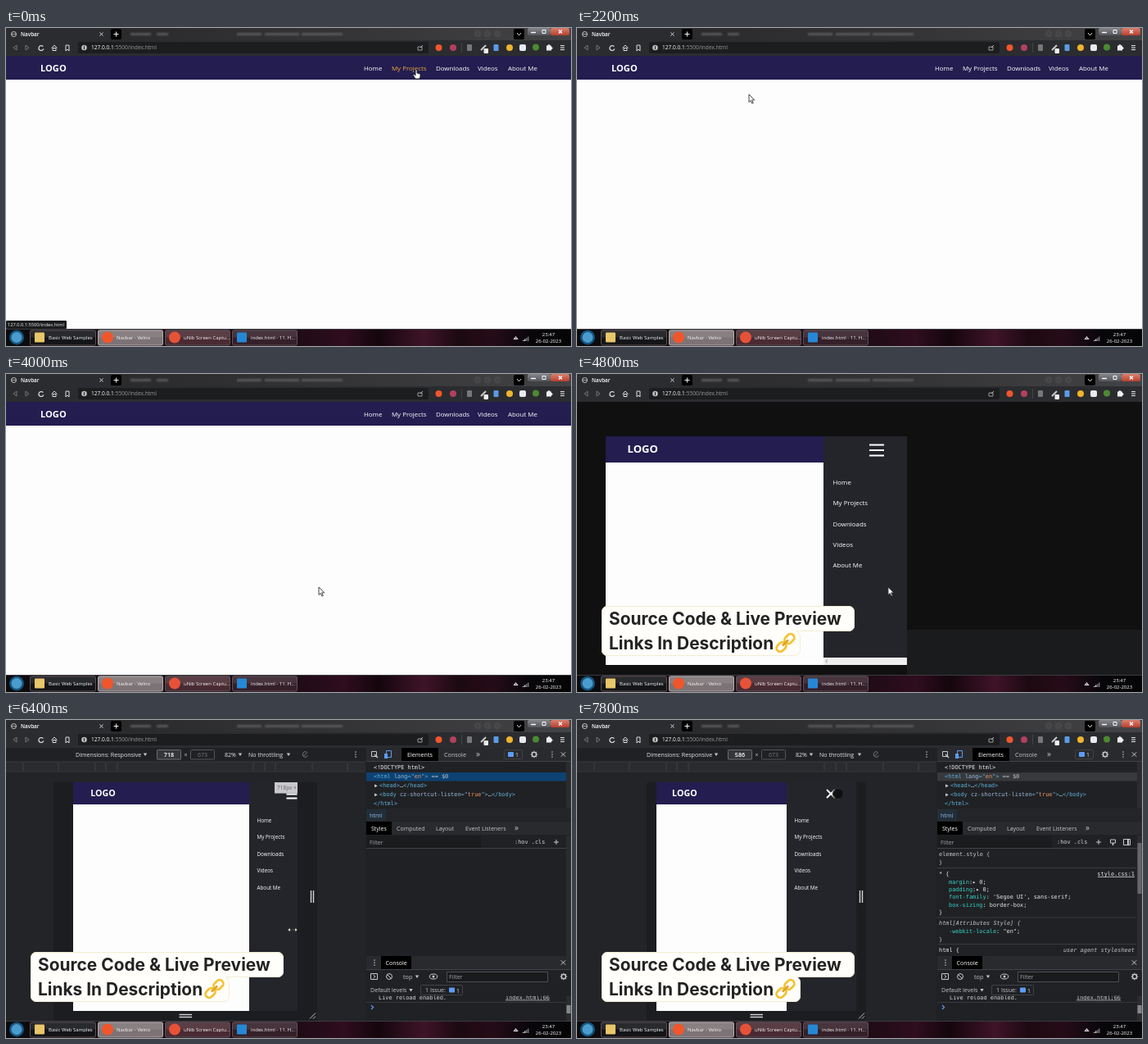
Recreate the animation shown at these times as an HTML page with a canvas. Size 690x388 px, loop 8000 ms.

```html
<!DOCTYPE html>
<html lang="en">
<head>
<meta charset="utf-8">
<title>Responsive navbar</title>
<style>
html, body { margin: 0; width: 690px; height: 388px; overflow: hidden; background: #111; }
canvas { display: block; }
</style>
</head>
<body>
<canvas id="stage" width="690" height="388"></canvas>
<script>
const ctx = document.getElementById('stage').getContext('2d');
const UI = '"Open Sans", sans-serif', MONO = '"DejaVu Sans Mono", monospace', HEAD = 'Inter, sans-serif';
const NAVY = '#231d50', GREY = '#c4c8cc', LINE = '#3f4246', BLUE = '#5d9cf5';
const LINKS = [['Home', 437, 459], ['My Projects', 471, 513], ['Downloads', 525, 565], ['Videos', 576, 601], ['About Me', 613, 649]];
const CURSOR = [
  [0, 501, 51], [300, 540, 50], [600, 588, 49], [900, 632, 50], [1100, 632, 50], [1500, 490, 50],
  [1800, 310, 60], [2200, 210, 81], [2300, 210, 81], [2800, 500, 50], [2900, 500, 50], [3200, 612, 50],
  [3300, 612, 50], [3500, 382, 260], [4300, 382, 260], [4800, 380, 260], [5000, 380, 260], [5400, 407, 247],
  [5800, 407, 250], [6400, 350, 256], [6600, 335, 257], [6800, 335, 257], [7000, 319, 90], [8000, 319, 90]
];

const ramp = (t, a, b) => Math.min(1, Math.max(0, (t - a) / (b - a)));

function rect(x, y, w, h, color, r = 0) {
  ctx.fillStyle = color;
  ctx.beginPath();
  ctx.roundRect(x, y, w, h, r);
  ctx.fill();
}
function disc(x, y, r, color) { rect(x - r, y - r, 2 * r, 2 * r, color, r); }
function path(points, color, width = 1, close = false) {
  ctx.strokeStyle = color;
  ctx.lineWidth = width;
  ctx.beginPath();
  for (let i = 0; i < points.length; i += 2) ctx.lineTo(points[i], points[i + 1]);
  if (close) ctx.closePath();
  ctx.stroke();
}
function ring(x, y, r, color, width = 1, from = 0, to = 7) {
  ctx.strokeStyle = color;
  ctx.lineWidth = width;
  ctx.beginPath();
  ctx.arc(x, y, r, from, Math.min(to, from + 2 * Math.PI));
  ctx.stroke();
}
function frame(x, y, w, h, color, r = 0) {
  ctx.strokeStyle = color;
  ctx.lineWidth = 1;
  ctx.beginPath();
  ctx.roundRect(x, y, w, h, r);
  ctx.stroke();
}
function gradient(x, y, stops) {
  const g = ctx.createLinearGradient(0, 0, x, y);
  stops.forEach(s => g.addColorStop(...s));
  return g;
}
function text(s, x, y, size = 7, color = GREY, family = UI, style = '500', align = 'left') {
  ctx.font = `${style} ${size}px ${family}`;
  ctx.fillStyle = color;
  ctx.textAlign = align;
  ctx.textBaseline = 'alphabetic';
  ctx.fillText(s, x, y + size * 0.36);
  return ctx.measureText(s).width;
}
function code(x, y, ...runs) {
  for (let i = 0; i < runs.length; i += 2) x += text(runs[i], x, y, 6.9, runs[i + 1], MONO, '');
}
function cross(x, y, r, color, width = 1) {
  path([x - r, y - r, x + r, y + r], color, width);
  path([x - r, y + r, x + r, y - r], color, width);
}
function plus(x, y, r, color) {
  path([x - r, y, x + r, y], color);
  path([x, y - r, x, y + r], color);
}
function dots(x, y, color = GREY) { for (let k = -1; k < 2; k++) disc(x, y + 3 * k, 0.8, color); }
function down(x, y, color = GREY) {
  ctx.fillStyle = color;
  ctx.beginPath();
  ctx.moveTo(x - 2.2, y - 1.5); ctx.lineTo(x + 2.2, y - 1.5); ctx.lineTo(x, y + 2);
  ctx.fill();
}
function gear(x, y) {
  ring(x, y, 2.6, GREY, 1.4);
  for (let a = 0; a < 6.2; a += Math.PI / 4)
    path([x + 3 * Math.cos(a), y + 3 * Math.sin(a), x + 4.3 * Math.cos(a), y + 4.3 * Math.sin(a)], GREY, 1.2);
}

function browser() {
  rect(0, 0, 690, 16, gradient(690, 0, [[0.18, '#2a2a2c'], [0.6, '#343436'], [1, '#434346']]));
  rect(0, 0, 126, 16, '#2b2c2f', 2);
  rect(0, 15, 690, 19, '#2b2c2f');
  ring(9.5, 7.5, 3, '#ccc');
  path([6.5, 7.5, 12.5, 7.5], '#ccc', 0.7);
  text('Navbar', 18, 7.5, 6.4, '#fff', UI, '600');
  cross(116.5, 7.5, 2, '#ddd');
  rect(128, 1, 13, 13, '#000', 2);
  plus(134.5, 7.5, 3, '#eee');
  ctx.filter = 'blur(1.2px)';
  for (const [x, w] of [[152, 25], [184, 14], [282, 30], [316, 42], [361, 50]]) rect(x, 6, w, 3, '#58585b');
  for (let x = 576; x < 610; x += 12) ring(x, 7, 3, '#626264');
  ctx.filter = 'none';
  rect(620, 1, 13, 13, '#000', 2);
  path([624, 6, 626.5, 9, 629, 6], '#ddd');
  rect(637, 0, 28, 9, gradient(0, 9, [[0, '#85868b'], [1, '#54565c']]), 2);
  rect(665, 0, 23, 9, gradient(0, 9, [[0, '#d9806f'], [1, '#b93f2f']]), 2);
  path([641, 5.5, 647, 5.5], '#fff', 1.4);
  frame(655, 2.5, 4, 4, '#fff');
  cross(677, 4.5, 2, '#fff', 1.3);

  path([13, 21, 9, 24, 13, 27], '#777', 1, true);
  path([24, 21, 28, 24, 24, 27], '#777', 1, true);
  ring(43, 24.5, 3, '#ddd', 1.2, 0.3, 5.6);
  path([55.5, 24.5, 59, 21, 62.5, 24.5], '#ddd');
  frame(57, 24.5, 4, 3, '#ddd');
  path([73, 21, 77, 21, 77, 28, 75, 26, 73, 28], '#ddd', 1, true);
  rect(88, 17, 428, 14, '#1c1d1f', 2);
  disc(95.5, 24, 3.3, '#bbb');
  path([95.5, 22, 95.5, 26], '#222');
  const host = text('127.0.0.1', 104, 24, 6.6, '#fff');
  text(':5500/index.html', 104 + host, 24, 6.6, '#999');
  frame(503, 23, 5, 4, '#999');
  path([506, 24, 509, 21], '#bbb');
  disc(528.5, 24, 4, '#f0562b');
  disc(546, 24, 4, '#b2405f');
  path([556.5, 18, 556.5, 30], '#444');
  rect(563, 20, 6, 8, '#777', 1);
  path([580, 27, 586, 21], '#ccc', 2);
  rect(583.5, 25, 5.5, 6, '#eee', 1);
  rect(595.5, 20, 6, 8, '#5a9be6', 1);
  disc(615, 24, 4, '#eeb42e');
  rect(627, 20, 8, 8, '#e8eaf0', 2);
  disc(647, 23.5, 4, '#4b8a32');
  rect(660, 21.5, 6, 6, '#eee');
  disc(663, 21.5, 1.5, '#eee');
  disc(666, 24.5, 1.5, '#eee');
  for (let y = 21.5; y < 28; y += 2.5) path([677, y, 682, y], '#ddd', 1.1);
}

function taskbar() {
  rect(0, 367, 690, 21, gradient(690, 0, [[0, '#0b0b0d'], [0.5, '#1c0b14'], [0.6, '#2f0d1e'], [0.66, '#14060d'],
    [0.74, '#3f1428'], [0.8, '#1c0911'], [0.86, '#260c18'], [0.93, '#08060a'], [1, '#050506']]));
  rect(0, 367, 690, 1, '#3b3b3f');
  disc(13, 377.5, 9, '#16547f');
  disc(13, 377.5, 6.5, '#4a9ccc');
  [['Basic Web Samples', 29, 81, '#141518', '#e8c66a'], ['Navbar - Velno', 112, 80, '#7d7376', '#f0562b'],
   ['uNib Screen Captu...', 194, 80, '#4a2b33', '#e65238'], ['index.html - 11. H...', 276, 80, '#35202a', '#2688d4']]
    .forEach(([label, x, w, color, icon], i) => {
      rect(x, 368.5, w, 18.5, color, 2);
      rect(x, 368.5, w, 9, 'rgba(255,255,255,.09)', 2);
      frame(x + 0.5, 369, w - 1, 18, i == 1 ? '#b3aaad' : '#5f5157', 2);
      if (i == 1 || i == 2) disc(x + 12, 377.5, 7, icon);
      else rect(x + 6, 371.5, 12, 12, icon, 1);
      text(label, x + 23, 377.5, 6, '#fff');
    });
  path([620.5, 379.5, 622.5, 377, 624.5, 379.5], '#ddd', 1.2, true);
  for (let i = 0; i < 4; i++) rect(631 + i * 2, 381 - i * 1.5, 1.4, 1 + i * 1.5, i < 2 ? '#ddd' : '#777');
  text('23:47', 662.5, 373.5, 6, '#fff', UI, '500', 'center');
  text('26-02-2023', 662.5, 382, 6, '#fff', UI, '500', 'center');
}

function wideSite(hovered) {
  rect(0, 34, 690, 333, '#fdfdfd');
  rect(0, 34, 690, 29, NAVY);
  text('LOGO', 42, 49, 11.1, '#fff', UI, 'bold');
  for (const link of LINKS) text(link[0], link[1], 49, 7.9, link === hovered ? '#eda63c' : '#fff');
}

const liveWidth = t => 886 - 300 * ramp(t, 5800, 6590);
function sidebarShut(t) {
  if (t < 6285) return ramp(t, 4800, 5100);
  return t < 7000 ? ramp(t, 6285, 6580) : 1 - ramp(t, 7000, 7300);
}

function narrowSite(t) {
  const half = Math.round(liveWidth(t) * 0.4155 / 2), width = 2 * half, left = 219 - half, right = 219 + half;
  const small = t >= 6285, dragging = t > 5800 && t < 6700;
  const barHeight = small ? 27 : 32, midBar = small ? 90 : 92.5;
  ctx.save();
  ctx.beginPath();
  ctx.rect(left, 76, width, 279);
  ctx.clip();
  rect(left, 76, width, 279, '#fdfdfd');
  rect(left, 76, width, barHeight, NAVY);
  text('LOGO', left + width * 0.072 + (small ? 1.5 : 0), midBar - (small ? 0.5 : 1), small ? 10.7 : 13.1, '#fff', UI, 'bold');

  const sideWidth = width * (small ? 0.35 : 0.277), side = Math.round(right - sideWidth * (1 - sidebarShut(t)));
  rect(side, 76, sideWidth + 1, 279, '#24252b');
  LINKS.forEach(([label], i) =>
    text(label, side + (small ? 9.5 : 11.5), small ? 122.5 + i * 20.5 : 132.5 + i * 25.1, small ? 6.3 : 7.9, '#fff'));
  if (t < 5000) {
    rect(side, 346, sideWidth, 9, '#eeeeef');
    path([305.5, 348.5, 304, 350.5, 305.5, 352.5], '#888');
  }
  const menuX = right - (small ? (dragging ? 7 : 31) : 37);
  if (t >= 7000) cross(menuX, midBar, 5, '#fff', 1.8);
  else for (let k = -1; k < 2; k++) {
    const reach = small ? 6.5 : 9, gap = small ? 5 : 6.5;
    path([menuX - reach, midBar + 0.5 + k * gap, menuX + reach, midBar + 0.5 + k * gap], '#fff', 2);
  }
  if (dragging) {
    rect(right - 28, 76, 28, 13.5, '#c9c9cd');
    text(Math.floor(liveWidth(t - 160)) + 'px ×', right - 25, 83, 6.5, '#666');
  }
  ctx.restore();
}

function deviceBar(t) {
  const w = Math.floor(liveWidth(t - 160)), half = Math.round(w * 0.4155 / 2), edge = 219 + half;
  rect(0, 34, 439, 333, '#232428');
  rect(0, 34, 439, 17, '#202124');
  rect(0, 51, 439, 12, '#2a2b2f');
  path([0, 51, 439, 51], LINE, 0.7);
  path([0, 63, 439, 63], '#3a3b3f', 0.7);
  for (const d of [83, 97, 110, 155, 198]) {
    path([219 - d, 52, 219 - d, 62], '#404146');
    path([219 + d, 52, 219 + d, 62], '#404146');
  }
  text('Dimensions: Responsive', 85, 42, 7.1, '#e4e6e8');
  down(170, 42);
  rect(184, 36, 30, 12.5, '#35363a', 1);
  frame(184.5, 36.5, 29, 11.5, '#6a6c70', 1);
  text(w, 199, 42, 7.2, '#fff', UI, '600', 'center');
  text('×', 219.5, 42, 7, GREY, UI, '', 'center');
  frame(225.5, 36.5, 29, 11.5, '#55575b', 1);
  text('673', 240, 42, 7, '#74777b', UI, '', 'center');
  text('82%', 267, 42, 7.1, '#e4e6e8');
  down(286, 42);
  text('No throttling', 296, 42, 7.1, '#e4e6e8');
  down(345, 42);
  ring(365.5, 42, 3.3, '#74777b', 1, 0.4, 5.4);
  path([363.5, 44, 367.5, 40], '#74777b', 1);
  dots(427, 42);

  rect(219 - half - 12, 76, 2 * half + 24, 291, '#1c1d20', 3);
  for (const d of [-1.5, 1.5]) {
    path([edge + 6 + d, 208, edge + 6 + d, 223], '#d4d5d8', 1.4);
    path([211.5, 361 + d, 227, 361 + d], '#d4d5d8', 1.4);
  }
  path([edge + 3, 364.5, edge + 10, 357.5], '#c4c5c8');
  path([edge + 7, 364.5, edge + 10, 361.5], '#c4c5c8');
}

function elements(styled) {
  const tag = '#5db0d7', attr = '#9bbbdc', val = '#f29766', prop = '#35d4c7', white = '#e8eaed';
  rect(440, 64, 250, 10.5, styled ? '#37393d' : '#0d4272');
  code(449, 58, '<!DOCTYPE html>', white);
  code(449, 69, '<html ', tag, 'lang', attr, '="', tag, 'en', val, '">', tag, ' == $0', GREY);
  text('▶', 450, 79.5, 6.5, GREY, MONO, '');
  code(456, 80, '<head>', tag, '…', GREY, '</head>', tag);
  text('▶', 450, 90.5, 6.5, GREY, MONO, '');
  code(456, 91, '<body ', tag, 'cz-shortcut-listen', attr, '="', tag, 'true', val, '">', tag, '…', GREY, '</body>', tag);
  code(449, 101.5, '</html>', tag);
  rect(684, 51, 6, 57, '#2b2c2f');
  rect(440, 108, 250, 15.5, '#242528');
  rect(440, 109, 24, 14, '#232e38');
  text('html', 444, 116, 7.2, '#8ab9ee');
  rect(440, 124, 250, 16, '#292a2d');
  rect(440, 124, 31, 16, '#000');
  text('Styles', 446, 132, 7, '#fff');
  text('Computed', 477, 132, 7);
  text('Layout', 525, 132, 7);
  text('Event Listeners', 561, 132, 7);
  text('»', 621, 131.5, 10);
  rect(440, 141, 140, 15, '#1b1c1e');
  path([440, 156.5, 690, 156.5], LINE);
  text('Filter', 444, 149, 7, '#a0a3a8');
  const shift = styled ? 586 : 621;
  code(shift, 149, ':hov .cls', '#d5d7da');
  plus(shift + 51, 149, 3, GREY);
  if (styled) {
    frame(651.5, 146, 6, 4, GREY);
    path([654.5, 150, 654.5, 153], GREY, 1.5);
    frame(667.5, 145.5, 8, 7, GREY);
    path([673, 145, 673, 153], GREY, 2);
  }
  if (!styled) { rect(684, 141, 6, 147, '#2b2c2f'); return; }
  code(442, 163.5, 'element.style {', GREY);
  code(442, 173.5, '}', GREY);
  code(442, 187.5, '* {', white);
  code(454, 198, 'margin', prop, ':▸ 0;', white);
  code(454, 207, 'padding', prop, ':▸ 0;', white);
  code(454, 216, 'font-family', prop, ": 'Segoe UI', sans-serif;", white);
  code(454, 225.5, 'box-sizing', prop, ': border-box;', white);
  code(442, 235, '}', white);
  text('html[Attributes Style] {', 442, 247.5, 6.9, GREY, MONO, 'italic');
  code(454, 258, '-webkit-locale', prop, ': "en";', white);
  code(442, 267.5, '}', GREY);
  code(442, 280.5, 'html {', white);
  text('style.css:1', 681, 187.5, 6.9, white, MONO, '', 'right');
  path([636, 191.5, 681, 191.5], white, 0.7);
  text('user agent stylesheet', 681, 280.5, 6.9, GREY, MONO, 'italic', 'right');
  for (const y of [180.5, 241, 273.5]) path([440, y, 683, y], LINE, 0.8);
  rect(684, 141, 6, 147, '#2b2c2f');
  rect(684.5, 150, 5, 62, '#65676b');
}

function badge(x, y) {
  rect(x, y - 3.5, 7, 6, BLUE, 1);
  text('1', x + 9, y, 7, '#d5d7da');
}

function devtools(t) {
  const loaded = t >= 5600;
  rect(439, 34, 251, 333, '#202124');
  rect(440, 34, 250, 16.5, '#292a2d');
  frame(446.5, 38.5, 6, 6, GREY);
  path([450, 42, 454, 46], GREY, 1.5);
  frame(464.5, 37.5, 6, 8, BLUE);
  rect(462, 41, 4, 6, BLUE);
  rect(483, 34, 45, 16.5, '#000');
  text('Elements', 490, 42, 7.2, '#fff');
  text('Console', 535, 42, 7.2);
  if (loaded) {
    text('»', 574, 41.5, 10);
    frame(608.5, 36.5, 22, 11, LINE, 1);
    badge(613, 42.5);
    gear(645, 42);
    dots(667, 42);
  } else {
    text('Sources', 576, 42, 7.2);
    text('Network', 617, 42, 7.2);
    text('»', 658, 41.5, 10);
  }
  cross(680.5, 42, 2.7, GREY);
  path([440, 50.5, 690, 50.5], LINE);
  if (loaded) elements(t >= 6900);

  rect(440, 288, 250, 16.5, '#292a2d');
  dots(450, 296);
  rect(458, 288, 37, 16.5, '#000');
  text('Console', 463.5, 296, 7, '#fff');
  cross(680.5, 296, 2.7, GREY);
  path([440, 304.5, 690, 304.5], LINE);
  frame(445.5, 309.5, 8, 7, GREY);
  path([448.5, 311, 451, 313, 448.5, 315], GREY);
  ring(468, 313, 3.5, GREY);
  path([465.5, 310.5, 470.5, 315.5], GREY);
  const eye = loaded ? 522 : 511;
  if (loaded) text('top', 485, 313, 7.2);
  down(loaded ? 502 : 491, 313, loaded ? GREY : '#666');
  ctx.strokeStyle = GREY;
  ctx.beginPath();
  ctx.ellipse(eye, 313, 4.7, 3, 0, 0, 7);
  ctx.stroke();
  disc(eye, 313, 1.5, GREY);
  rect(eye + 16, 307, 646 - eye, 13, '#191a1c');
  frame(eye + 16.5, 307.5, 645 - eye, 12, '#4c4f53');
  text('Filter', eye + 19, 313.5, 7, '#a0a3a8');
  gear(681, 313);
  text('Default levels', 445, 329.5, 7.1);
  down(494.5, 329.5);
  frame(506.5, 323.5, loaded ? 51 : 42, 12, LINE, 1);
  text(loaded ? '1 Issue:' : 'No Issues', 512, 329.5, 7.1);
  if (loaded) {
    badge(541, 330);
    ctx.save();
    ctx.beginPath();
    ctx.rect(440, 336.5, 250, 10);
    ctx.clip();
    code(455, 338.5, 'Live reload enabled.', '#d5d7da');
    text('index.html:66', 664, 338.5, 6.9, GREY, MONO, '', 'right');
    path([610, 342, 664, 342], GREY, 0.7);
    ctx.restore();
    path([440, 344.5, 684, 344.5], LINE, 0.7);
    rect(684, 337, 6, 30, '#2b2c2f');
    rect(684.5, 348, 5, 10, '#85878b');
  } else path([440, 336.5, 690, 336.5], LINE, 0.7);
  const y = loaded ? 350.5 : 345;
  path([446, y - 2.5, 448.5, y, 446, y + 2.5], BLUE, 1.2);
  if (!loaded) path([454.5, y - 4, 454.5, y + 4], '#ddd');
}

function banner(alpha) {
  ctx.globalAlpha = alpha;
  for (const [y, w] of [[283, 309], [313, 243]]) {
    rect(30, y, w, 31, '#fffefa', 7);
    frame(30.5, y + 0.5, w - 1, 30, '#f4ecd2', 7);
  }
  rect(30, 306, 238, 14, '#fffefa');
  text('Source Code & Live Preview', 39, 298, 20.9, '#232323', HEAD, 'bold');
  text('Links In Description', 39, 328, 20.9, '#232323', HEAD, 'bold');
  ctx.save();
  ctx.translate(254.5, 328);
  ctx.rotate(-Math.PI / 4);
  for (const x of [-13.5, 0.5]) {
    ctx.strokeStyle = '#f5c232';
    ctx.lineWidth = 2.8;
    ctx.beginPath();
    ctx.roundRect(x, -4.5, 13, 9, 4.5);
    ctx.stroke();
  }
  path([-5, 0, 5, 0], '#e0a529', 2.8);
  ctx.restore();
  ctx.globalAlpha = 1;
}

function position(t) {
  const i = CURSOR.findIndex(k => k[0] > t), [a, x, y] = CURSOR[i - 1], [b, x2, y2] = CURSOR[i];
  const p = ramp(t, a, b);
  return [x + (x2 - x) * p, y + (y2 - y) * p];
}
function linkAt(t) {
  if (t < 0 || t >= 4400) return;
  const [x, y] = position(t);
  return LINKS.find(l => x >= l[1] && x <= l[2] && y > 43 && y < 56);
}

function shape(d, x, y, fill, stroke) {
  const p = new Path2D(d);
  ctx.save();
  ctx.translate(x, y);
  ctx.fillStyle = fill;
  ctx.strokeStyle = stroke;
  ctx.lineWidth = 0.9;
  ctx.fill(p);
  ctx.stroke(p);
  ctx.restore();
}
function pointer(t, overLink) {
  const [x, y] = position(t);
  if (t >= 6900) {
    disc(x, y, 7, 'rgba(10,10,12,.75)');
    ring(x, y, 6.5, '#3b3c40', 0.8);
  } else if (t >= 5300) {
    shape('M-6 0l3-2.5v2h6v-2l3 2.5-3 2.5v-2h-6v2z', x, y, '#fff', '#333');
  } else if (overLink) {
    shape('M-1 0q1-1 2 0v4l4 1v3l-1 3h-5l-3-5 1-1 2 2z', x, y, '#fff', '#222');
  } else {
    shape('M0 0v9.5l2.2-2 1.6 3.6 1.5-.7-1.6-3.5h3z', x, y, '#fff', '#333');
  }
}

function draw() {
  const t = Math.floor(performance.now() % 8000 / 100) * 100;
  const hovered = linkAt(t);
  ctx.clearRect(0, 0, 690, 388);
  if (t < 4400) {
    wideSite(hovered);
    if (hovered || linkAt(t - 200)) {
      rect(0, 357, 74, 10, '#1b1c1e', 1);
      text('127.0.0.1:5500/index.html', 2, 362, 5.7, '#eee');
    }
  } else {
    rect(0, 34, 690, 333, '#101011');
    if (t < 5000) rect(403, 312, 287, 55, '#1a1b1c');
    else { deviceBar(t); devtools(t); }
    narrowSite(t);
  }
  browser();
  taskbar();
  if (t >= 4400) banner(ramp(t, 4300, 4600));
  pointer(t, hovered);
  requestAnimationFrame(draw);
}
draw();
</script>
</body>
</html>
```
